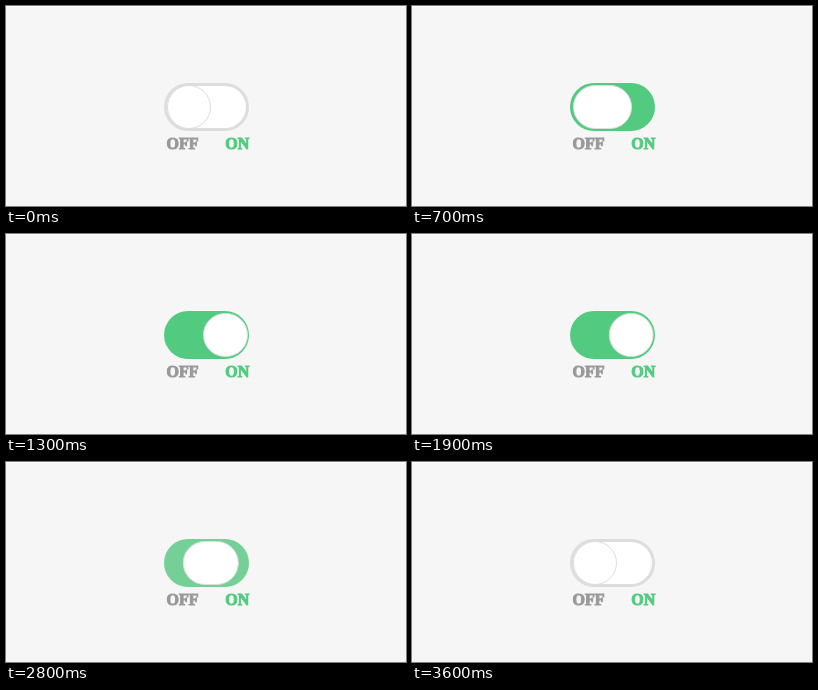
Write an HTML page that moves like this. It is 400 px wide and 200 px high and loops after 3.8 s.

```html
<!DOCTYPE html>
<html lang="en">
<head>
<meta charset="utf-8">
<title>Toggle switch</title>
<style>
  html, body { margin: 0; width: 100%; height: 100%; overflow: hidden; background: #f6f6f6; }
  svg { display: block; width: 100vw; height: 100vh; }
  text { font: bold 16px "Liberation Serif", "Times New Roman", serif; stroke-width: 1; }
  .off { fill: #999; stroke: #999; }
  .on { fill: #52cb80; stroke: #52cb80; }
</style>
</head>
<body>
<svg viewBox="0 0 400 200">
  <rect width="400" height="1" fill="#fff"/>
  <rect id="track" x="158" y="77" width="85" height="48" rx="24"/>
  <rect id="well" x="161" y="80" width="79" height="42" rx="21" fill="#fff"/>
  <rect id="knob" y="79.5" height="43" rx="21.5" fill="#fff" stroke="#ddd"/>
  <text class="off" x="160.6" y="143.4">OFF</text>
  <text class="on" x="219.3" y="143.4">ON</text>
</svg>
<script>
  const LOOP = 3800, STEP = 100;
  const OFF = [221, 221, 221], ON = [82, 203, 128];

  // time, knob left, knob right, switched-on amount
  const keys = [
    [0, 161, 205, 0],
    [100, 161, 205, 0],
    [700, 161, 220, 1],
    [800, 161, 220, 1],
    [1300, 197, 242, 1],
    [1700, 198, 241.5, 1],
    [1800, 198, 241.5, 1],
    [2400, 191, 242, 1],
    [2600, 182, 242, 1],
    [3400, 161, 205, 0],
    [LOOP, 161, 205, 0]
  ];

  const [track, well, knob] = ["track", "well", "knob"].map(id => document.getElementById(id));
  const mix = (a, b, k) => a + (b - a) * k;

  function pose(t) {
    const i = keys.findIndex(key => key[0] > t);
    const a = keys[i - 1], b = keys[i];
    const k = (t - a[0]) / (b[0] - a[0]);
    return a.map((v, n) => mix(v, b[n], k));
  }

  function draw(t) {
    const [, left, right, on] = pose(t);
    const rgb = OFF.map((v, n) => Math.round(mix(v, ON[n], on)));
    track.setAttribute("fill", `rgb(${rgb})`);
    well.setAttribute("opacity", Math.max(0, 1 - 2 * on));
    knob.setAttribute("x", left + 0.5);
    knob.setAttribute("width", right - left - 1);
    // the outline is paler for a moment after the knob lands
    knob.setAttribute("stroke", t >= 3400 && t < 3600 ? "#e8e8e8" : "#ddd");
  }

  const start = performance.now();
  function tick() {
    const t = (performance.now() - start) % LOOP;
    draw(Math.floor(t / STEP) * STEP);
    requestAnimationFrame(tick);
  }
  tick();
</script>
</body>
</html>
```
